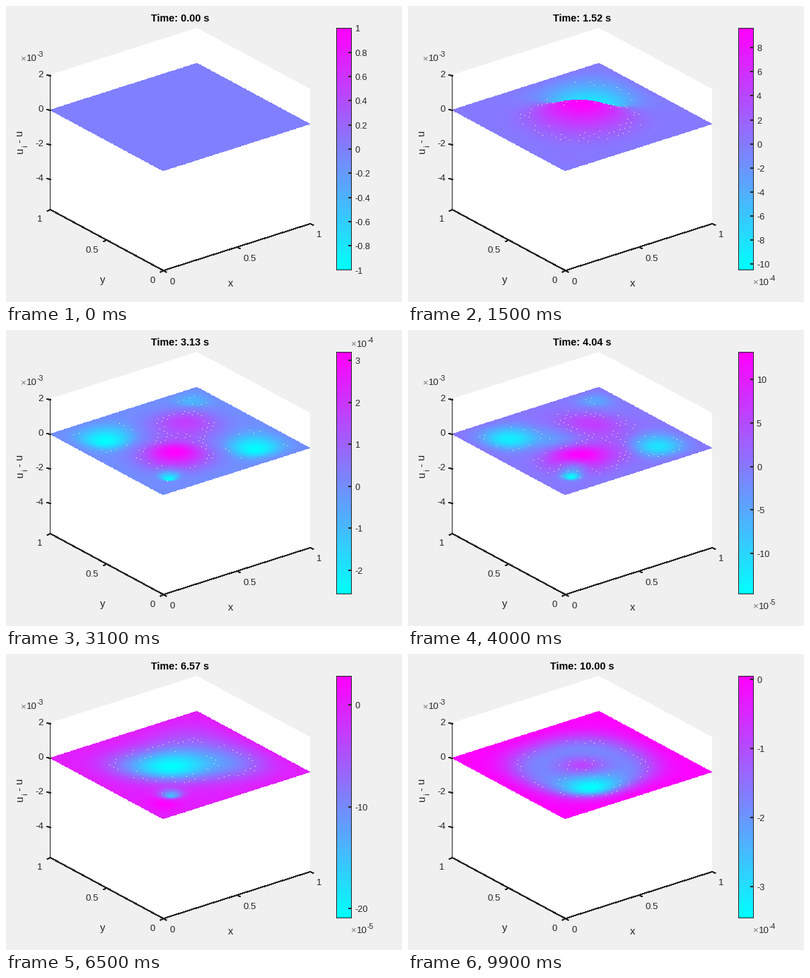
A matplotlib script that plays this animation: 560x420 px, repeating every 10 s.

```python
import numpy as np
import matplotlib.pyplot as plt
from matplotlib.animation import FuncAnimation

W, H, DPI = 560, 420, 100
FRAMES, N = 100, 112
INK = "#262626"

fig = plt.figure(figsize=(W / DPI, H / DPI), dpi=DPI, facecolor="#f0f0f0")
ax = fig.add_axes([0, 0, 1, 1])
ax.axis("off")


def full_stage():
    ax.set_xlim(0, W)
    ax.set_ylim(H, 0)


def project(x, y, z=0):
    """Stage position of a point; z is in units of 1e-4."""
    return 222 + 208 * x - 160 * y, 234 - 66.5 * x - 86.5 * y - 2.45 * z


def text(x, y, s, size=13.2, ha="center", va="center_baseline", color=INK,
         **kw):
    return ax.text(x, y, s, fontsize=size * .72, family="Liberation Sans",
                   ha=ha, va=va, color=color, **kw)


def line(*pts):
    p = np.array(pts) + .5
    return ax.plot(p[:, 0], p[:, 1], color=INK, lw=.72, snap=False,
                   antialiased=False, zorder=5)[0]


def power(x, y, e):
    return [text(x - 2, y, "×", 13.2, "left", color="#777777"),
            text(x + 7, y, "10", 13.2, "left"),
            text(x + 22, y - 5.5, str(e), 10.5, "left")]


# Rows run from the far edge to the near one, so near cells paint last.
side = np.linspace(1, 0, N + 1)
X, Y = np.meshgrid(side, side)
R = np.hypot(X, Y)
EDGE = np.prod([np.tanh(4 * d) for d in (X, 1 - X, Y, 1 - Y)], axis=0)
SPREAD = 2 * X * Y / np.maximum(R, 1e-6) ** 2


# Error field, in units of 1e-4
def spot(x, y, a, s):
    return a * np.exp(-((X - x) ** 2 + (Y - y) ** 2) / s ** 2)


def pair(x, y, a, s):
    return spot(x, y, a, s) + spot(y, x, a, s)


def ring(r, a, inner, outer, dist=R):
    return a * np.exp(-((dist - r) / np.where(dist < r, inner, outer)) ** 2)


def fit(lo, hi, u):
    u = u * EDGE
    return np.where(u > 0, u * hi / max(u.max(), 1e-9),
                    u * lo / min(u.min(), -1e-9))


def outgoing(t):
    """Front that leaves the source near (0.2, 0.2)."""
    p = t / T1
    r = .1 + .55 * p
    u = (ring(r, -20, .1, .23) * np.sqrt(SPREAD)
         + ring(r - .2, 11, .18, .13) * SPREAD + spot(.19, .19, -9, .06))
    surge = np.sin(np.pi * p) ** 2
    return fit(-20.4 * p - 36 * surge, 8.5 * p + 7 * surge, u)


def at(i):
    return i * 10 / (FRAMES - 1)


T1 = at(8)
MID = np.hypot(X - .5, Y - .5)
keys = [
    (T1, outgoing(T1)),
    (1.42, fit(-13, 12, spot(.75, .75, -13, .25) + spot(.5, .5, 12, .25))),
    (at(21), fit(-6.76, 6.6, spot(.84, .84, 10, .15) + pair(.46, .87, -6, .17)
                 + spot(.47, .47, -6.5, .19) + spot(.1, .1, 7, .08))),
    (at(31), fit(-2.57, 3.2, pair(.17, .83, -3, .17) + spot(.33, .33, 4, .19)
                 + spot(.66, .66, 2.2, .2) + spot(.92, .92, -3, .12)
                 + spot(.18, .18, -4.5, .06))),
    (at(49), fit(-1.6, .45, spot(.42, .6, -1.2, .22) + spot(.82, .77, -.9, .25)
                 + spot(.25, .25, -2, .08) + spot(.6, .22, .7, .18)
                 + pair(.08, .3, .7, .12))),
    (at(65), fit(-2.09, .28, spot(.46, .55, -1.5, .22) + spot(.8, .35, -1, .28)
                 + spot(.8, .8, -.5, .28) + spot(.25, .7, -.6, .2)
                 + spot(.23, .23, -2, .06) + spot(.08, .12, .9, .1))),
    (8.0, fit(-4, .1, spot(.44, .44, -3, .28) + pair(.4, .75, -1.2, .22))),
    (at(99), fit(-3.45, .045, ring(.27, -1.7, .24, .19, MID)
                 + spot(.4, .28, -1.6, .16) + spot(.05, .05, .4, .05))),
]


def sway(t):
    return sum(np.sin(m * np.pi * X) * np.sin(n * np.pi * Y)
               * np.cos(np.pi * np.hypot(m, n) * t)
               for m in (1, 2) for n in (1, 2)) / 2.5


def field(t):
    if t < T1:
        return outgoing(t)
    for (t0, a), (t1, b) in zip(keys, keys[1:]):
        if t <= t1 + 1e-9:
            w = (t - t0) / (t1 - t0)
            amp = .18 * min(-a.min(), -b.min()) * np.sin(np.pi * w)
            return a + (b - a) * w + amp * sway(t)


def scale(lo, hi):
    """Tick step and shown exponent for a value range."""
    span = hi - lo
    base = 10 ** np.floor(np.log10(span))
    m = span / base
    step = .2 if m < 2.1 else .5 if 2.5 < m < 3.2 else 1
    return step * base, int(np.round(np.log10(span))) - 1


# Box
TOP, FLOOR = 20.4, -57.5
left, front, right = (project(*c, FLOOR) for c in ((0, 1), (0, 0), (1, 0)))
peak = project(0, 1, TOP)
ax.fill(*zip(peak, project(1, 1, TOP), project(1, 0, TOP), right, front, left),
        color="white", lw=0)
line(peak, left, front, right)
for z in (20, 0, -20, -40):
    x, y = project(0, 1, z)
    line((x - 4, y - 1), (x, y))
    text(53, y - 2, f"{z // 10}", ha="right")
line((left[0] - 4, left[1] + 2), left)
for v in (0, .5, 1):
    x, y = project(v, 0, FLOOR)
    line((x, y), (x + 4, y + 2))
    text(x + 9, y + 15.5, f"{v:g}", ha="left")
    x, y = project(0, v, FLOOR)
    line((x, y), (x - 4, y + 2))
    text(x - 11, y + 13.5, f"{v:g}", ha="right")
text(137, 388, "y", 14.7)
text(318, 393, "x", 14.7)
for x, y, s, size in ((24, 209, "u", 14.7), (30, 200, "i", 11.5),
                      (24, 194, "- u", 14.7)):
    text(x, y, s, size, "left", "baseline", rotation=90,
         rotation_mode="anchor")
power(22, 74, -3)
title = text(246, 17, "", 14.4, weight="bold", color="black")

# Colour bar
ax.imshow(np.linspace(1, 0, 256)[:, None], cmap="cool", aspect="auto",
          extent=(467, 489, 375, 31), interpolation="bilinear", zorder=2)
line((467, 31), (488, 31), (488, 374), (467, 374), (467, 31))

# Specks sit on a thinned lattice of surface points
rng = np.random.default_rng(4)
lattice = np.zeros(X.shape, bool)
lattice[9:-9:4, 9:-9:4] = True
lattice &= rng.random(X.shape) < .6
specks, = ax.plot([], [], ",", color="#ffffd8", zorder=4)
moving = []


def update(i):
    while moving:
        moving.pop().remove()
    t = at(i)
    title.set_text(f"Time: {t:.2f} s")
    u = field(t) if i else np.zeros_like(X)
    lo, hi = (u.min() * 1e-4, u.max() * 1e-4) if i else (-1, 1)
    step, e = scale(lo, hi) if i else (.2, 0)

    px, py = project(X, Y, u)
    v = u * 1e-4
    cell = (v[1:, 1:] + v[:-1, 1:] + v[1:, :-1] + v[:-1, :-1]) / 4
    moving.append(ax.pcolormesh(px, py, cell, cmap="cool", vmin=lo, vmax=hi,
                                shading="flat", zorder=3))
    full_stage()

    c = (v - lo) / (hi - lo)
    on = lattice & ((abs(c - .62) < .05) | (abs(c - .36) < .04))
    specks.set_data(px[on], py[on])

    for k in range(int(np.ceil(lo / step - 1e-6)),
                   int(np.floor(hi / step + 1e-6)) + 1):
        y = 374 - 343 * (k * step - lo) / (hi - lo)
        moving.append(line((484, y), (488, y)))
        label = f"{round(k * step / 10.0 ** e, 3) + 0:g}"
        moving.append(text(493, y + 1, label, 12.6, "left"))
    if e:
        moving.extend(power(489, 19 if hi > -lo else 391, e))


anim = FuncAnimation(fig, update, frames=FRAMES, interval=100, repeat=True)
plt.show()
```
